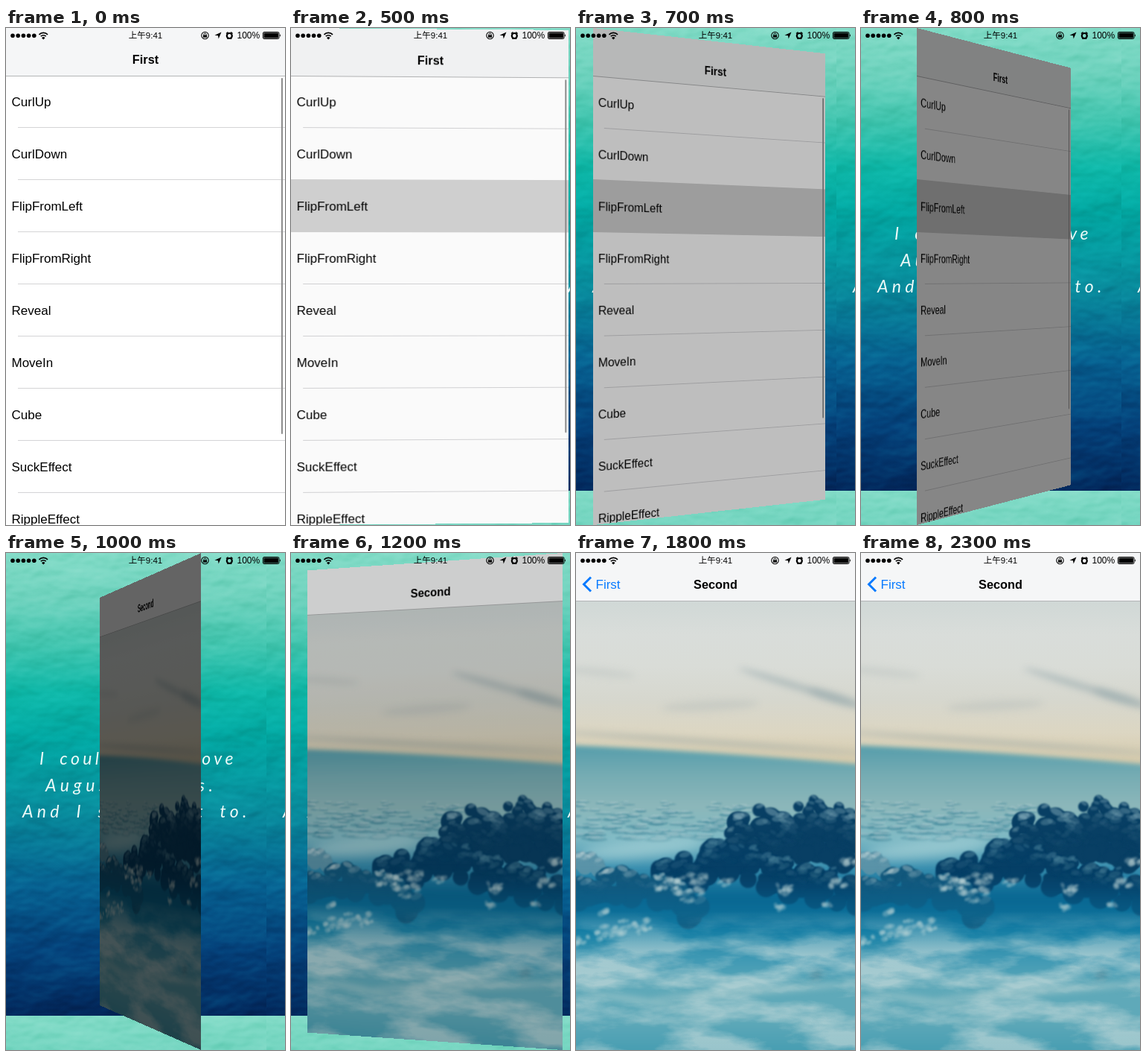
An HTML page with a canvas that plays this animation: 375x667 px, repeating every 2.4 s.

```html
<!DOCTYPE html>
<html lang="en">
<head>
<meta charset="utf-8">
<title>Flip transition</title>
<style>
html, body { margin: 0; width: 100%; height: 100%; overflow: hidden; }
body { position: relative; font-family: "Liberation Sans", Arial, sans-serif; color: #000; }
svg, canvas, .page { position: absolute; left: 0; top: 0; width: 375px; height: 667px; }
.page { overflow: hidden; background: #fff; }
.page > * { position: absolute; }
.bar { left: 0; top: 0; width: 375px; height: 64px; background: #f5f6f7; border-bottom: 1px solid #b4b5b6; }
.bar b { position: absolute; width: 375px; top: 32px; text-align: center; font-size: 16.3px; line-height: 20px; }
.row { left: 0; width: 367.5px; height: 70px; padding-left: 7.5px; font-size: 17px; line-height: 71px; }
.row::after { content: ""; position: absolute; left: 16px; right: 0; bottom: 0; height: 1px; background: #d4d4d6; }
.pressed { background: #d3d3d3; margin-top: -1px; padding-top: 1px; }
.pressed::after { display: none; }
.thumb { left: 369.5px; top: 67px; width: 2.5px; height: 478px; border-radius: 2px; background: #8c8c8c; }
.shade { inset: 0; background: #000; }
#back { color: #087aff; font-size: 17px; }
#back svg { width: 70px; height: 64px; }
</style>
</head>
<body>
<svg viewBox="0 0 375 667">
  <defs>
    <linearGradient id="deep" x2="0" y2="1">
      <stop offset="0" stop-color="#84dcc8"/>
      <stop offset=".1" stop-color="#6dd2bd"/>
      <stop offset=".2" stop-color="#42c6b0"/>
      <stop offset=".3" stop-color="#0db6a6"/>
      <stop offset=".4" stop-color="#02a8a3"/>
      <stop offset=".56" stop-color="#088b9c"/>
      <stop offset=".72" stop-color="#066090"/>
      <stop offset=".86" stop-color="#04417a"/>
      <stop offset="1" stop-color="#02285c"/>
    </linearGradient>
    <filter id="crumple" x="0" y="0" width="1" height="1" color-interpolation-filters="sRGB">
      <feTurbulence type="fractalNoise" baseFrequency=".011 .018" numOctaves="4" seed="8"/>
      <feDiffuseLighting surfaceScale="2.4" lighting-color="#fff" result="folds">
        <feDistantLight azimuth="70" elevation="30"/>
      </feDiffuseLighting>
      <feBlend in="folds" in2="SourceGraphic" mode="soft-light"/>
    </filter>
    <pattern id="paper" width="350" height="621" patternUnits="userSpaceOnUse">
      <rect width="350" height="621" fill="url(#deep)" filter="url(#crumple)"/>
      <g fill="#eefaf8" font-family="Lato, cursive" font-style="italic" font-size="23">
        <text x="45" y="284" letter-spacing="4.4" word-spacing="7">I could never love</text>
        <text x="53" y="320" letter-spacing="5.600">August flowers.</text>
        <text x="22" y="355" letter-spacing="5.300" word-spacing="7">And I still want to.</text>
      </g>
    </pattern>
  </defs>
  <rect width="375" height="667" fill="url(#paper)"/>
</svg>

<div class="page" id="first">
  <div class="bar"><b>First</b></div>
</div>

<div class="page" id="second">
  <canvas id="sky" width="375" height="667"></canvas>
  <svg viewBox="0 0 375 667">
    <defs>
      <linearGradient id="mist" x2="0" y2="1">
        <stop offset="0" stop-color="#c4d9d9" stop-opacity="0"/>
        <stop offset=".35" stop-color="#c4d9d9" stop-opacity=".75"/>
        <stop offset="1" stop-color="#c4d9d9" stop-opacity=".65"/>
      </linearGradient>
      <filter id="wisps" x="0" y="0" width="1" height="1" color-interpolation-filters="sRGB">
        <feTurbulence type="fractalNoise" baseFrequency=".008 .024" numOctaves="5" seed="5"/>
        <feColorMatrix values="0 0 0 0 1  0 0 0 0 1  0 0 0 0 1  3.6 0 0 0 -1.4" result="noise"/>
        <feComposite in="SourceGraphic" in2="noise" operator="in"/>
      </filter>
    </defs>
    <rect y="480" width="375" height="187" fill="url(#mist)" filter="url(#wisps)"/>
  </svg>
  <div class="bar"><b>Second</b>
    <div id="back"><svg viewBox="0 0 70 64">
      <path d="M20 32.5 10.5 42 20 51.500" fill="none" stroke="currentColor" stroke-width="3"/>
      <text x="26.500" y="48" fill="currentColor">First</text>
    </svg></div>
  </div>
</div>

<svg viewBox="0 0 375 667" id="status">
  <g id="dots"></g>
  <g fill="none" stroke="#000" stroke-width="1.7">
    <path d="M44.500 8.800a8 8 0 0 1 11.500 0M46.800 11.200a5 5 0 0 1 6.900 0"/>
    <circle cx="267.500" cy="10" r="4.700" stroke-width="1.100"/>
    <path d="M266 10V8.500a1.500 1.500 0 0 1 3 0V10" stroke-width="1"/>
    <circle cx="300.300" cy="10.500" r="3.500" stroke-width="2.200"/>
    <path d="M296 7.500 298.500 5.500M304.600 7.500 302.100 5.500M297.500 14.800 298.500 13.500M303.100 14.800 302.100 13.500" stroke-width="1.400"/>
    <rect x="345.500" y="5.500" width="21.500" height="9" rx="1.500" stroke-width="1"/>
  </g>
  <path d="M48 13.200a3.200 3.200 0 0 1 4.500 0L50.250 15.500ZM265 9.600h5v3.200h-5ZM289.500 5.500 285.700 14.500 285 10.200 280.500 9.700ZM346.500 6.500h19.500v7h-19.500ZM368 8.300a2 2 0 0 1 0 3.400Z"/>
  <g font-size="12">
    <text x="187.500" y="14.300" text-anchor="middle" font-family="Liberation Sans, Noto Sans CJK SC, Noto Sans CJK, sans-serif" font-size="11.500">上午9:41</text>
    <text x="310.500" y="14.300">100%</text>
  </g>
</svg>

<script>
const $ = id => document.getElementById(id);
const first = $('first'), second = $('second');

function add(parent, cls, text = '') {
  const el = document.createElement('div');
  el.className = cls;
  el.textContent = text;
  return parent.appendChild(el);
}

const names = ['CurlUp', 'CurlDown', 'FlipFromLeft', 'FlipFromRight', 'Reveal',
  'MoveIn', 'Cube', 'SuckEffect', 'RippleEffect'];
const rows = names.map((name, i) => {
  const row = add(first, 'row', name);
  row.style.top = 64 + 70 * i + 'px';
  return row;
});
add(first, 'thumb');
const shades = [first, second].map(page => add(page, 'shade'));

$('dots').innerHTML = [0, 1, 2, 3, 4]
  .map(i => `<circle cx="${9 + 7.2 * i}" cy="10.3" r="2.8"/>`).join('');

// Cloudscape
const c = $('sky').getContext('2d');
let seed = 11;
const rnd = (a = 0, b = 1) => {
  seed = (seed * 16807) % 2147483647;
  return a + (b - a) * seed / 2147483647;
};

function fade(y0, y1, colors) {
  const g = c.createLinearGradient(0, y0, 0, y1);
  colors.forEach((col, i) => g.addColorStop(i / (colors.length - 1), col));
  return g;
}

function oval(x, y, rx, ry, color, tilt = 0) {
  c.fillStyle = color;
  c.beginPath();
  c.ellipse(x, y, rx, ry, tilt, 0, 7);
  c.fill();
}

// Height of a polyline given as [x, y] points
function heightAt(pts, x) {
  const i = Math.max(1, pts.findIndex(p => p[0] >= x));
  const [a, b] = [pts[i - 1], pts[i]];
  return a[1] + (b[1] - a[1]) * (x - a[0]) / (b[0] - a[0]);
}

// Dark puffs along a crest, then soft light on their upper edges
function cloud(pts, depth, size, count, light, dark) {
  const x0 = pts[0][0], x1 = pts[pts.length - 1][0];
  const puffs = Array.from({ length: count }, (_, i) => {
    const x = rnd(x0, x1), r = size * rnd(.5, 1.2), k = i / count;
    return { x, r, k, y: heightAt(pts, x) + r + k * depth };
  });
  c.filter = 'blur(.8px)';
  for (const p of puffs) oval(p.x, p.y, p.r, p.r, dark);
  c.filter = 'blur(1.2px)';
  for (const p of puffs)
    oval(p.x + p.r * .1, p.y - p.r * .6, p.r * .6, p.r * .3,
      `rgba(${light},${.5 * (1 - p.k) ** 3})`, rnd(-.6, .6));
}

function paintSky() {
  c.fillStyle = fade(65, 285, ['#d0d8d6', '#d9ddda', '#d9dcd7', '#d6d7ce', '#dcd6c2', '#d5c9a9']);
  c.fillRect(0, 0, 375, 300);
  c.filter = 'blur(5px)';
  oval(300, 180, 85, 4, 'rgba(145,165,170,.6)', .3);
  oval(350, 195, 40, 6, 'rgba(145,165,170,.5)', .3);
  oval(180, 205, 65, 7, 'rgba(180,188,184,.4)', -.05);
  oval(30, 160, 50, 6, 'rgba(185,193,191,.4)', .1);
  oval(180, 254, 220, 3, 'rgba(160,170,165,.7)', .07);

  c.filter = 'blur(3px)';
  c.fillStyle = fade(258, 667, ['#559dab', '#76acb3', '#8cb7ba', '#80bac4', '#3a90b0',
    '#0b6c96', '#157fa6', '#3f99b4', '#5fa9b9', '#5fa9b9', '#489eb2']);
  c.beginPath();
  c.moveTo(-9, 258);
  c.quadraticCurveTo(180, 266, 384, 284);
  c.lineTo(384, 680);
  c.lineTo(-9, 680);
  c.fill();

  c.filter = 'blur(1.3px)';
  for (let i = 0; i < 110; i++) {
    const k = i / 110, x = rnd(0, 230), y = 334 + 52 * k;
    const w = rnd(4, 9) + 9 * k;
    oval(x, y, w, 1 + 2 * k, 'rgba(65,135,155,.45)');
    oval(x + rnd(-6, 6), y - 2, w * .7, 1 + k, 'rgba(190,213,214,.35)');
  }
  c.filter = 'blur(8px)';
  oval(90, 396, 85, 13, 'rgba(160,205,212,.8)', -.1);

  cloud([[205, 362], [220, 342], [243, 334], [272, 345], [300, 328], [318, 321], [345, 332], [380, 342]],
    70, 13, 130, '130,172,186', '#083f64');
  cloud([[103, 410], [130, 400], [163, 398], [185, 381], [212, 379], [260, 400], [330, 418], [380, 420]],
    40, 13, 120, '85,140,162', '#063f66');
  cloud([[0, 401], [20, 399], [34, 408]], 14, 9, 18, '215,228,228', '#5a93a8');
  cloud([[0, 430], [30, 425], [65, 415], [100, 427], [128, 430], [150, 444], [168, 457]],
    30, 13, 60, '200,218,218', '#13587c');

  c.filter = 'blur(9px)';
  c.fillStyle = fade(435, 520, ['rgba(6,92,138,0)', 'rgba(8,102,146,.7)', 'rgba(18,128,166,0)']);
  c.fillRect(-20, 435, 415, 85);

  // Bright scraps, each [x, y, size]
  c.filter = 'blur(1.6px)';
  for (const [x, y, w] of [[125, 446, 22], [150, 460, 20], [165, 438, 13], [201, 442, 8], [276, 452, 13],
    [272, 476, 6], [337, 472, 6], [352, 443, 10], [365, 414, 11], [80, 500, 22], [45, 509, 18], [8, 519, 10], [38, 482, 5]])
    for (let i = 0; i < w; i++)
      oval(x + rnd(-w, w), y + rnd(-w, w) * .5, rnd(2, 6), rnd(1.5, 4), 'rgba(195,217,219,.35)', -.4);

  c.filter = 'blur(4px)';
  oval(240, 588, 140, 4, 'rgba(205,220,216,.5)', -.08);
  oval(80, 600, 75, 4, 'rgba(205,220,216,.45)', .15);
  oval(323, 566, 8, 5, 'rgba(50,105,125,.6)', -.4);
  c.filter = 'none';
}
paintSky();

// Ease-in-out, cubic-bezier(.42, 0, .58, 1)
function ease(x) {
  if (x <= 0 || x >= 1) return x <= 0 ? 0 : 1;
  let lo = 0, hi = 1, t;
  for (let i = 0; i < 30; i++) {
    t = (lo + hi) / 2;
    const u = 1 - t;
    if (1.26 * u * u * t + 1.74 * u * t * t + t ** 3 < x) lo = t; else hi = t;
  }
  return t * t * (3 - 2 * t);
}

const LOOP = 2400, STEP = 100, START = 423, FLIP = 1000;

function draw(now) {
  const t = Math.floor(now % LOOP / STEP) * STEP;
  const turn = 180 * ease((t - START) / FLIP);
  const front = turn < 90;
  const angle = front ? turn : turn - 180;
  const sink = 187.5 * Math.sin(Math.abs(angle) * Math.PI / 180);
  const page = front ? first : second;
  first.style.display = front ? '' : 'none';
  second.style.display = front ? 'none' : '';
  page.style.transform = angle
    ? `perspective(1570px) translateZ(${-sink}px) rotateY(${angle}deg)` : 'none';
  shades[front ? 0 : 1].style.opacity = .8 * Math.abs(angle) / 90;
  rows[2].classList.toggle('pressed', t > START);
  $('back').style.display = t >= 1500 ? '' : 'none';
}

const begin = performance.now();
function loop() {
  draw(performance.now() - begin);
  requestAnimationFrame(loop);
}
loop();
</script>
</body>
</html>
```
